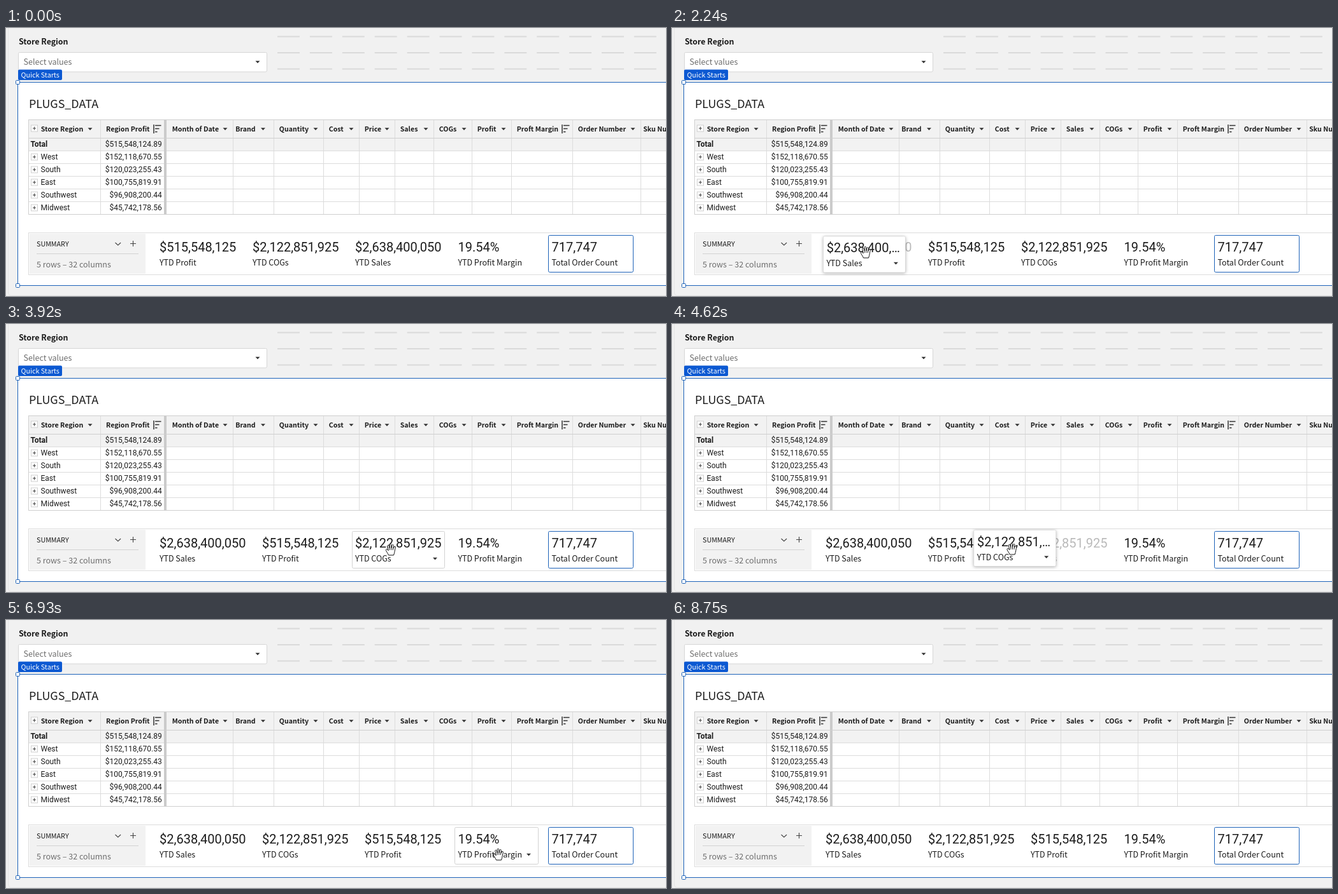
These frames come from a looping animation (1036 px wide and 422 px high, 9590 ms). An HTML page:

```html
<!DOCTYPE html>
<html lang="en">
<head>
<meta charset="utf-8">
<title>Summary reorder</title>
<style>
html, body { margin: 0; width: 100%; height: 100%; overflow: hidden; background: #f1f1f1; }
svg { display: block; width: 1036px; height: 422px; }
text { fill: #1c1c1c; font: 12.53px "Noto Sans CJK JP", "Noto Sans CJK SC", "Noto Sans", sans-serif; white-space: pre; }
.title { font-size: 17.9px; }
.small { font-size: 10.74px; }
.strong { font-size: 12.4px; font-weight: 700; }
.head { font-size: 10.65px; font-weight: 700; }
.cell { font: 12px Roboto, sans-serif; }
.total { font-weight: 700; }
.num { font: 20px Roboto, sans-serif; }
.soft { fill: #6e6e6e; }
.light { fill: #fff; }
.float { filter: drop-shadow(0 1px 2.5px rgba(0, 0, 0, .3)); }
</style>
</head>
<body>
<svg viewBox="0 0 1036 422"><g id="page"></g><g id="live"></g></svg>
<script>
const LOOP = 9590, STEP = 70, BLUE = '#1d62b8', LINE = '#dcdcdc', GREY = '#f2f2f2';
const page = document.getElementById('page'), live = document.getElementById('live');

const text = (x, y, s, cls = '', attr = '') => `<text x="${x}" y="${y}" class="${cls}" ${attr}>${s}</text>`;
const rect = (x, y, w, h, fill, stroke = 'none', attr = '') =>
  `<rect x="${x}" y="${y}" width="${w}" height="${h}" fill="${fill}" stroke="${stroke}" ${attr}/>`;
const path = (d, stroke, width = 1, fill = 'none') =>
  `<path d="${d}" fill="${fill}" stroke="${stroke}" stroke-width="${width}"/>`;
const caret = (x, y) => path(`M${x - 3.5} ${y - 1.8}h7l-3.5 3.7z`, 'none', 0, '#333');
const plusBox = y => rect(39.5, y, 10, 10, '#fff', '#cfcfcf') + path(`M42 ${y + 5}h5m-2.5 -2.5v5`, '#444');
const sortIcon = x => path(`M${x} 152v14M${x + 2} 153.5h9.5m-9.5 5h6.5m-6.5 5h3.5`, '#333', 1.5);

function controls() {
  let s = path('M3.5 0V416q0 5 5 5.5H1036', '#e4e4e4');
  for (let i = 0; i < 36; i++)
    s += path(`M${426 + i % 12 * 50.9} ${13.5 + Math.floor(i / 12) * 25.5}h35`, '#dadada', 1.8);
  return s + text(20, 26, 'Store Region', 'strong') +
    rect(19.5, 38.5, 390, 30.5, '#fff', '#d6d6d6', 'rx="2"') + caret(395, 53.5) +
    text(27.5, 58, 'Select values', 'soft');
}

function panel() {
  return rect(18.5, 85.5, 1030, 320, '#fff', BLUE) +
    [82.5, 402.5].map(y => rect(15.5, y, 6, 6, '#fff', BLUE, 'rx="1"')).join('') +
    rect(19, 65.5, 69, 16.5, '#0c59d2', 'none', 'rx="2"') +
    text(23.5, 77.7, 'Quick Starts', 'small light') + text(36, 126, 'PLUGS_DATA', 'title');
}

function table() {
  // left edge, name, content shift, sorted
  const columns = [[252, 'Month of Date'], [356, 'Brand', -4.5], [420, 'Quantity'], [498, 'Cost'],
    [554, 'Price'], [610, 'Sales'], [671, 'COGs'], [731, 'Profit'], [793, 'Proft Margin', 0, true],
    [889, 'Order Number'], [996, 'Sku Number', -4.5]];
  const rows = [['Total', '$515,548,124.89'], ['West', '$152,118,670.55'], ['South', '$120,023,255.43'],
    ['East', '$100,755,819.91'], ['Southwest', '$96,908,200.44'], ['Midwest', '$45,742,178.56']];
  let s = rect(35, 144, 1001, 49, GREY);
  for (let y = 193.5; y < 294; y += 20) s += path(`M35 ${y}H1036`, LINE);
  columns.forEach(([x, name, shift = 0, sorted], i) => {
    const next = i + 1 < columns.length ? columns[i + 1][0] : 1100;
    if (i) s += path(`M${x + .5} 144V293`, LINE);
    s += text(x + 8.7 + shift, 163, name, 'head') + (sorted ? sortIcon(next - 16) : caret(next - 12 + shift, 159));
  });
  s += path('M148.5 144V293', LINE) + path('M250 144V293', '#cbcbcb', 4);
  s += path('M35 144.5H1036M35 173.5H1036M35.5 144V293.5H1036', '#cfcfcf');
  s += plusBox(153) + text(54.7, 163, 'Store Region', 'head') + caret(132, 159);
  s += text(157, 163, 'Region Profit', 'head') + sortIcon(232);
  rows.forEach(([name, value], i) => {
    const y = 187 + i * 20;
    s += i ? plusBox(y - 9) + text(54.5, y, name, 'cell') : text(38.5, y, name, 'cell total');
    s += text(244.7, y, value, 'cell', 'text-anchor="end"');
  });
  return s;
}

function summary() {
  return rect(35.5, 322.5, 1010, 66, '#fff', LINE) + rect(37, 324, 182, 63, GREY) +
    text(48, 343.5, 'SUMMARY', 'small') +
    path('M171.5 338l4.3 4 4.3 -4M195 339.5h9m-4.5 -4.5v9', '#444', 1.1) +
    path('M48 355.5H208', '#d2d2d2') + text(48, 376.5, '5 rows – 32 columns', 'soft');
}

const ramp = (t, from, to) => Math.min(1, Math.max(0, (t - from) / (to - from)));
const easeOut = p => p * (2 - p);
const slide = (t, start) => {
  const p = ramp(t, start, start + 200);
  return p * p * (3 - 2 * p);
};

// pointer moves: from, to (ms), then where it ends
const moves = [[350, 420, 592, 373], [770, 980, 594, 356], [1190, 1400, 616, 352], [1540, 2230, 304, 353],
  [3290, 3600, 440, 384], [3600, 3920, 604, 355], [4200, 5600, 466, 353], [5950, 6440, 650, 371],
  [6580, 6930, 773, 369], [7560, 8050, 905, 368], [8260, 8750, 600, 440]];
function pointer(t) {
  let x = 592, y = 381;
  for (const [from, to, tx, ty] of moves) {
    const p = easeOut(ramp(t, from, to));
    x += (tx - x) * p;
    y += (ty - y) * p;
  }
  return [x, y];
}

// the card trails the pointer by lag ms, held at (dx, dy)
const drags = [{ from: 1610, to: 3360, drop: 3290, item: 2, dx: 67, dy: 25, lag: 35 },
  { from: 4200, to: 6020, drop: 6020, item: 1, dx: 62, dy: 29.5, lag: 15 }];

const HAND = 'M-3.5 9C-4.5 6 -7 3.5 -7.5 1.5C-8 -.7 -6 -1.2 -5 .3L-3.8 1.8L-5.2 -5C-5.6 -7 -3.3 -7.4 -2.8 -5.5' +
  'L-1.8 -2L-1.8 -7.5C-1.8 -9.3 .6 -9.3 .7 -7.5L.9 -2L2 -6.5C2.5 -8.4 4.7 -7.7 4.3 -5.8L3.7 -1.5' +
  'L5.1 -3.9C6.2 -5.4 7.8 -4.5 7.3 -2.9C6 .8 6.5 4 4.5 9Z';

function render(t) {
  const s1 = slide(t, 1660), s2 = slide(t, 1960), s3 = slide(t, 4760);
  const items = [
    { label: 'YTD Profit', value: '$515,548,125', w: 130, x: 241 + 161 * (s2 + s3) },
    { label: 'YTD COGs', value: '$2,122,851,925', w: 145, x: 387 + 161 * s1 - 146 * s3 },
    { label: 'YTD Sales', value: '$2,638,400,050', w: 145, x: 548 - 161 * s1 - 146 * s2 },
    { label: 'YTD Profit Margin', value: '19.54%', w: 131, x: 709.5 },
    { label: 'Total Order Count', value: '717,747', w: 133, x: 856.5, picked: true }];
  const [hx, hy] = pointer(t);
  const drag = drags.find(d => t >= d.from && t < d.to);
  const held = drag && items[drag.item];
  const awake = t >= 770 && t < 8750 && !drag;
  let s = '';

  for (const it of items) {
    const left = Math.floor(it.x - 5) + .5, right = left + it.w;
    const hover = awake && hx > left && hx < right && hy > 327 && hy < 384;
    if (it.picked || hover) s += rect(left, 326.5, it.w, 58, '#fff', it.picked ? BLUE : '#d2d2d2', 'rx="2"');
    const alpha = it !== held ? 1 : t < drag.drop ? .3 : 0;
    s += `<g opacity="${alpha}">${text(it.x, 352, it.value, 'num')}${text(it.x, 374, it.label)}</g>`;
    if (hover) s += caret(right - 15, 369.5);
  }
  if (drag) {
    const [px, py] = pointer(t - drag.lag), x = px - drag.dx, y = py - drag.dy;
    s += rect(x, y, 129, 57, '#fff', '#d0d0d0', 'rx="2" stroke-width=".6" class="float"') +
      text(x + 5.3, y + 25, held.value.slice(0, -3) + '…', 'num') +
      text(x + 5, y + 47, held.label) + caret(x + 114, y + 42.5);
  }
  if (t >= 350 && t < 8750)
    s += `<g transform="translate(${hx} ${hy})">${path(HAND, '#111', 1, '#fff')}` +
      path('M-1.8 -2v3M.9 -2v3M3.7 -1.5l-.4 2.5', '#111', .9) + '</g>';
  live.innerHTML = s;
}

let last = -1;
function tick(now) {
  const t = Math.floor(now % LOOP / STEP) * STEP;
  if (t !== last) render(last = t);
  requestAnimationFrame(tick);
}
page.innerHTML = controls() + panel() + table() + summary();
render(0);
requestAnimationFrame(tick);
</script>
</body>
</html>
```
